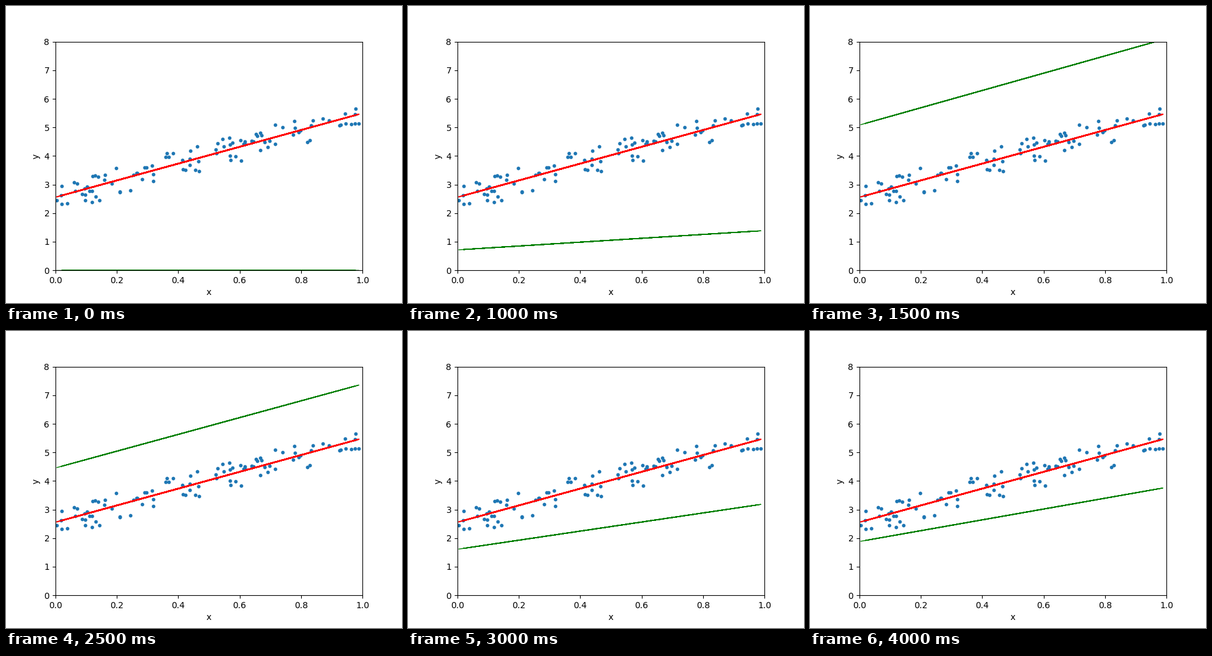
Recreate the animation shown at these times as a matplotlib script. Size 640x480 px, loop 4.5 s.

```python
import numpy as np
import matplotlib.pyplot as plt
from matplotlib.animation import FuncAnimation

STEPS = 9
RATE = 1.5

np.random.seed(0)
x = np.random.rand(100)
y = 2 + 3 * x + np.random.rand(100)
X = np.column_stack([np.ones_like(x), x])
best = np.linalg.lstsq(X, y, rcond=None)[0]


def descend(steps):
    """Parameters after each step of batch gradient descent from zero."""
    theta = np.zeros(2)
    path = [theta]
    for _ in range(steps - 1):
        theta = theta - RATE * X.T @ (X @ theta - y) / len(y)
        path.append(theta)
    return path


path = descend(STEPS)

fig, ax = plt.subplots(figsize=(6.4, 4.8), dpi=100)
ax.scatter(x, y, s=10)
ax.plot(x, X @ best, color="red")
fit, = ax.plot(x, X @ path[0], color="green", lw=1)
ax.set(xlim=(0, 1), ylim=(0, 8), xlabel="x", ylabel="y")


def update(i):
    fit.set_ydata(X @ path[i])
    return fit,


anim = FuncAnimation(fig, update, frames=STEPS, interval=500,
                     repeat=True, repeat_delay=0)
plt.show()
```
